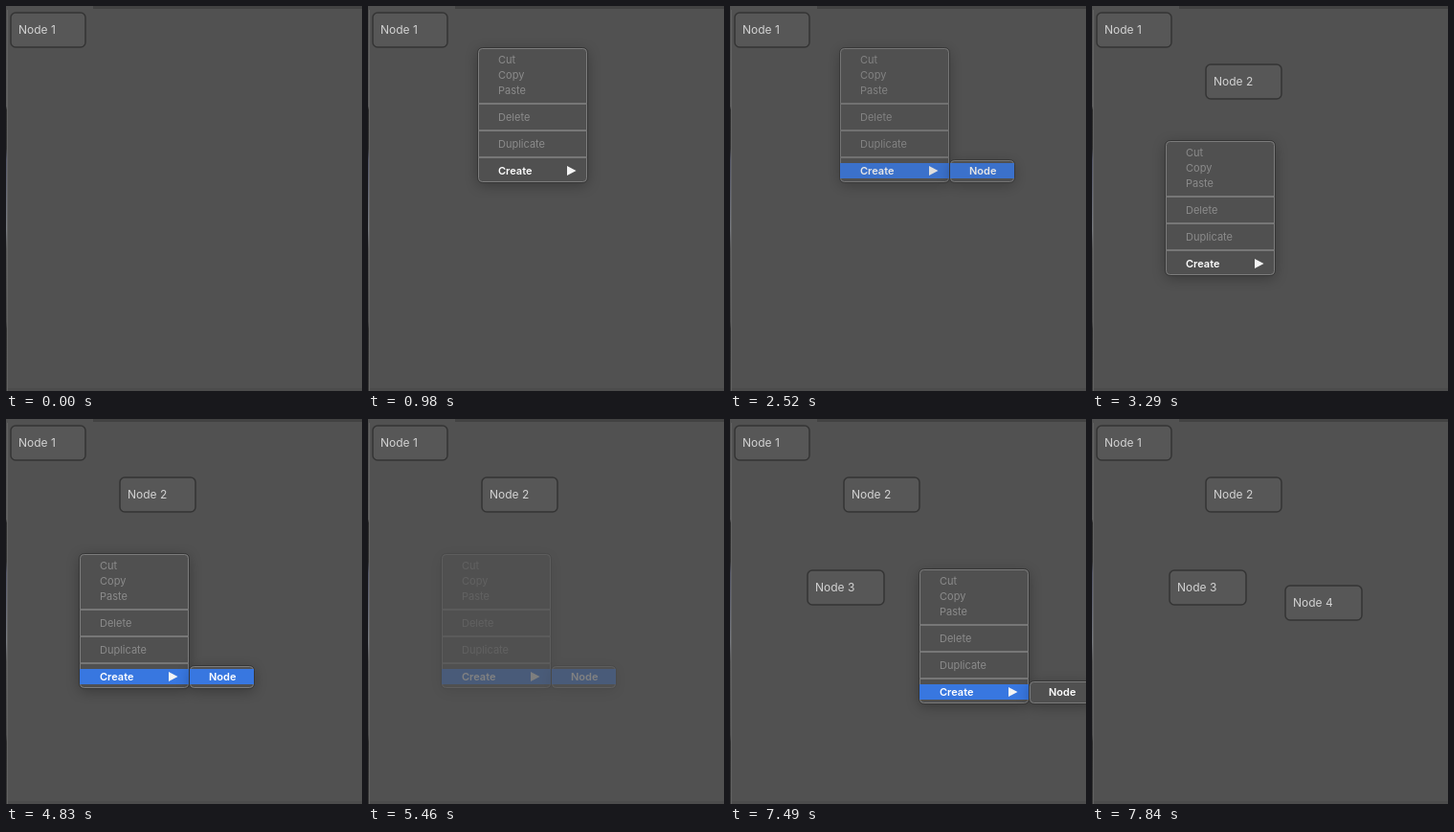
Animation of 372x402 px, one loop 8.61 s. Source, as an HTML page with a canvas:

```html
<!DOCTYPE html>
<html lang="en">
<head>
<meta charset="utf-8">
<title>Node graph context menu</title>
<style>
  html, body { margin: 0; width: 100%; height: 100%; overflow: hidden; background: #515151; }
  canvas { display: block; width: 372px; height: 402px; }
</style>
</head>
<body>
<canvas id="stage" width="372" height="402"></canvas>
<script>
const W = 372, H = 402, LOOP = 8610, STEP = 70;
const BLUE = '#3877e0';
const stage = document.getElementById('stage').getContext('2d');
const layer = document.createElement('canvas');
layer.width = W;
layer.height = H;
const menuCtx = layer.getContext('2d');

const nodes = [
  { x: 5, y: 7, w: 78, at: 0 },
  { x: 119, y: 61, w: 79, at: 2800 },
  { x: 81, y: 158, w: 80, at: 5600 },
  { x: 202, y: 174, w: 80, at: 7840 }
];

// Times: menu opens, Create is hovered, submenu opens, Node is hovered,
// click blink, fade start; fade holds the opacity of each step.
const menus = [
  { x: 115, y: 44, open: 980, hover: 1470, sub: 1750, pick: 1960, blink: 2380, out: 2520, fade: [0.86, 0.45] },
  { x: 77, y: 141, open: 3290, hover: 4270, sub: 4480, pick: 4830, blink: 5110, out: 5320, fade: [0.9, 0.6, 0.28] },
  { x: 198, y: 157, open: 6090, hover: 6510, sub: 6650, pick: 7070, blink: 7490, out: 7630, fade: [0.86, 0.45] }
];

const items = [['Cut', 16], ['Copy', 32], ['Paste', 48], ['Delete', 76], ['Duplicate', 104]];

function box(c, x, y, w, h, r) {
  c.beginPath();
  c.roundRect(x, y, w, h, r);
}

function label(c, text, x, y, font, color) {
  c.font = font + ' Inter, sans-serif';
  c.fillStyle = color;
  c.fillText(text, x, y);
}

function drawBackground(c) {
  c.fillStyle = '#515151';
  c.fillRect(0, 0, W, H);
  c.fillStyle = '#424242';
  c.fillRect(91, 0, W - 91, 3);
  c.fillStyle = '#4c4c4c';
  c.fillRect(0, 399, W, 3);
  const edge = c.createLinearGradient(0, 0, 0, H);
  [[0, '#505050'], [0.26, '#5c5c5c'], [0.27, '#2e2e2e'], [0.37, '#343434'],
   [0.4, '#545768'], [0.58, '#777a80'], [0.63, '#555'], [0.82, '#4a4a4a'],
   [0.84, '#303030'], [1, '#3a3a3a']].forEach(s => edge.addColorStop(...s));
  c.fillStyle = edge;
  c.fillRect(0, 0, 1, H);
  c.fillStyle = '#626262';
  c.fillRect(1, 4, 1, H - 4);
}

function drawNode(c, n, i) {
  box(c, n.x, n.y, n.w, 36, 5);
  c.fillStyle = '#575757';
  c.fill();
  c.lineWidth = 1.5;
  c.strokeStyle = '#343434';
  c.stroke();
  label(c, 'Node ' + (i + 1), n.x + 8, n.y + 22, '12px', '#d2d2d2');
}

function panel(c, x, y, w, h) {
  c.save();
  c.shadowColor = 'rgba(0,0,0,0.3)';
  c.shadowBlur = 14;
  c.shadowOffsetY = 3;
  box(c, x, y, w, h, 5);
  c.fillStyle = '#505050';
  c.fill();
  c.restore();
}

function outline(c, x, y, w, h) {
  c.lineWidth = 1;
  box(c, x - 0.5, y - 0.5, w + 1, h + 1, 5);
  c.strokeStyle = '#363636';
  c.stroke();
  box(c, x + 0.5, y + 0.5, w - 1, h - 1, 4);
  c.strokeStyle = '#7c7c7c';
  c.stroke();
}

function bar(c, x, y, w, h, color) {
  c.fillStyle = color;
  c.fillRect(x, y, w, h);
}

function drawMenu(c, m, t) {
  const { x, y } = m;
  const row = y + 120;
  c.clearRect(0, 0, W, H);
  panel(c, x, y, 114, 140);
  outline(c, x, y, 114, 140);
  for (const [text, dy] of items) label(c, text, x + 21, y + dy, '11px', '#8b8b8b');
  for (const dy of [57, 85, 113]) bar(c, x, y + dy, 114, 2, '#777');
  if (t >= m.hover) bar(c, x, row, 114, 16, BLUE);
  label(c, 'Create', x + 21, y + 132, '600 11px', '#fff');
  c.fillStyle = '#f4f4f4';
  c.beginPath();
  c.moveTo(x + 93, y + 123);
  c.lineTo(x + 102.5, y + 128);
  c.lineTo(x + 93, y + 133);
  c.fill();

  if (t >= m.sub) {
    const sx = x + 115, sy = y + 117;
    panel(c, sx, sy, 67, 23);
    outline(c, sx, sy, 67, 23);
    const blinkOff = t >= m.blink && t < m.blink + STEP;
    if (t >= m.pick && !blinkOff) bar(c, sx, row, 67, 16, BLUE);
    label(c, 'Node', sx + 20, y + 132, '600 11px', '#fff');
  }
}

function opacity(m, t) {
  if (t < m.open) return 0;
  if (t < m.out) return 1;
  return m.fade[Math.floor((t - m.out) / STEP)] || 0;
}

function render(t) {
  drawBackground(stage);
  nodes.forEach((n, i) => { if (t >= n.at) drawNode(stage, n, i); });
  for (const m of menus) {
    const alpha = opacity(m, t);
    if (!alpha) continue;
    drawMenu(menuCtx, m, t);
    stage.globalAlpha = alpha;
    stage.drawImage(layer, 0, 0);
    stage.globalAlpha = 1;
  }
}

const start = performance.now();
function tick() {
  render((performance.now() - start) % LOOP);
  requestAnimationFrame(tick);
}
tick();
</script>
</body>
</html>
```
